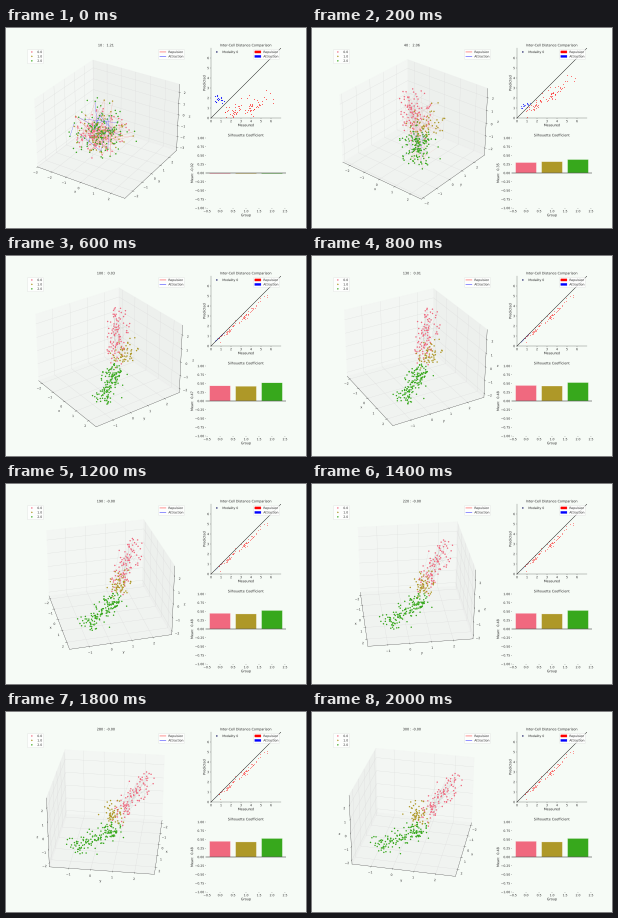
These frames come from a looping animation (300 by 200 pixels, 2.2 s). A matplotlib script:

```python
import numpy as np
import matplotlib.pyplot as plt
from matplotlib import patheffects
from matplotlib.animation import FuncAnimation
from matplotlib.lines import Line2D
from matplotlib.patches import Patch
from mpl_toolkits.mplot3d.art3d import Line3DCollection

INK = "#262626"
plt.rcParams.update({
    "font.family": "DejaVu Sans",
    "font.size": 12,
    "axes.titlesize": 12,
    "axes.labelsize": 12,
    "xtick.labelsize": 11,
    "ytick.labelsize": 11,
    "legend.fontsize": 11,
    "text.color": INK,
    "axes.labelcolor": INK,
    "xtick.color": INK,
    "ytick.color": INK,
    "grid.color": "#d8d8d8",
    "path.snap": False,
    "text.hinting": "none",
    # draws letters as outlines, placed between whole pixels
    "path.effects": [patheffects.Normal()],
})

BG = "#f6fbf6"
COLORS = ["#f0697f", "#ae9828", "#37a81c"]
FRAMES, STEP = 11, 200
LOSS = [1.21, 2.06, 0.12, 0.03, 0.01, 0.01, -0.001]
SPREAD = [0.14, 0.085, 0.064, 0.056]
PULL = [0, 0.68, 0.93, 0.98]

rng = np.random.default_rng(7)


def branch(start, bend, end, n):
    """Points spread evenly along a quadratic curve."""
    t = rng.uniform(0, 1, n)[:, None]
    a, b, c = map(np.array, (start, bend, end))
    return (1 - t) ** 2 * a + 2 * t * (1 - t) * b + t ** 2 * c


SIZES = [100, 55, 145]
SHAPE = np.vstack([
    branch((-0.02, 0.15, -0.08), (-0.20, 0.27, 0.07), (-0.38, 0.46, 0.29), SIZES[0]),
    branch((0.04, 0.12, -0.10), (0.22, 0.08, 0.08), (0.30, 0.06, 0.19), SIZES[1]),
    branch((0.38, -0.36, -0.30), (0.16, -0.08, -0.32), (0.00, 0.13, -0.20), SIZES[2]),
])
GROUP = np.repeat([0, 1, 2], SIZES)
NOISE = rng.normal(0, 1, SHAPE.shape)
ORDER = rng.permutation(len(SHAPE))

# Links: a few within a group, many between random cells
FAR = rng.integers(0, len(SHAPE), (80, 2))
NEAR = rng.integers(SIZES[0] + SIZES[1], len(SHAPE), (16, 2))

MEASURED = np.concatenate([rng.uniform(0.8, 3.8, 50), rng.uniform(3, 6, 20)])
JITTER = rng.normal(0, 1, MEASURED.size)
CLOSE = rng.uniform(0.35, 1.3, 16)
CLOSE_JITTER = rng.normal(0, 1, CLOSE.size)

LIM_START = np.array([[-3.0, 2.9], [-2.8, 2.9], [-3.3, 2.7]])
LIM_END = np.array([[-2.3, 2.6], [-1.9, 2.9], [-2.3, 2.7]])
BOX = np.array([1.1905, 1.1905, 0.893])


def at(values, k):
    return values[min(k, len(values) - 1)]


def settle(k, rate):
    return 1 - np.exp(-rate * k)


def draw_cells(k):
    ax = fig.add_axes([20 / 300, 0.1, 160 / 300, 0.8], projection="3d")
    ax.set_facecolor(BG)
    step = min(10 + 30 * k, 300)
    ax.view_init(elev=30, azim=-60 + 0.24 * step)

    lims = LIM_START + (LIM_END - LIM_START) * settle(k, 1.3)
    drift = np.exp(-3 * k) * np.array([-0.03, -0.11, -0.03])
    unit = at(PULL, k) * SHAPE + at(SPREAD, k) * NOISE + drift
    pts = lims.mean(axis=1) + unit / BOX * (lims[:, 1] - lims[:, 0])

    fade = np.exp(-0.9 * k)
    for pairs, color, alpha in ((FAR, "red", 0.35 * fade),
                                (NEAR, "blue", 0.8 * fade)):
        ax.add_collection3d(Line3DCollection(
            pts[pairs], colors=color, linewidths=0.8, alpha=alpha))
    link = [pts[[i, i + 3]] for i in range(0, SIZES[0] - 3, 2)]
    ax.add_collection3d(Line3DCollection(
        link, colors="gray", linewidths=0.6, alpha=0.25))

    ax.scatter(*pts[ORDER].T, c=[COLORS[g] for g in GROUP[ORDER]],
               s=27, linewidths=0, depthshade=False)

    ax.set(xlim=lims[0], ylim=lims[1], zlim=lims[2],
           xlabel="x", ylabel="y", zlabel="z")
    ax.set_title(f"{step} : {at(LOSS, k): .2f}")

    dots = [Line2D([], [], color=c, marker="o", ls="", ms=4) for c in COLORS]
    ax.add_artist(ax.legend(dots, ["0.0", "1.0", "2.0"], loc="upper left"))
    lines = [Line2D([], [], color=c, lw=1.5) for c in ("red", "blue")]
    ax.legend(lines, ["Repulsion", "Attraction"], loc="upper right")


def draw_distances(k):
    ax = fig.add_axes([205 / 300, 0.55, 70 / 300, 0.35])
    ax.set_facecolor(BG)
    ax.spines[["top", "right"]].set_visible(False)
    ax.plot([0, 7], [0, 7], color="black", lw=1.5)

    slope = at([0.33, 0.72, 0.9, 0.92], k)
    noise = at([0.5, 0.35, 0.26, 0.2], k)
    measured = MEASURED + 0.6 * np.exp(-1.5 * k)
    far = np.maximum(slope * measured + noise * JITTER - 0.05, 0.1)
    ax.scatter(measured, far, c="red", s=12, linewidths=0,
               alpha=at([0.5, 0.42, 0.36, 0.3], k))

    rest = np.exp(-0.8 * k)
    near = CLOSE * (1 - rest) + rest * (1.95 + 0.25 * CLOSE_JITTER)
    ax.scatter(CLOSE, near, c="blue", s=16, linewidths=0,
               alpha=0.9 * np.exp(-0.45 * k))

    ax.set(xlim=(0, 7), ylim=(0, 7), xticks=range(7), yticks=range(7),
           xlabel="Measured", ylabel="Predicted")
    ax.set_title("Inter-Cell Distance Comparison")
    dot = Line2D([], [], color="#101060", marker="o", ls="", ms=4)
    ax.add_artist(ax.legend([dot], ["Modality 0"], loc="upper left",
                            frameon=False))
    ax.legend([Patch(color="red"), Patch(color="blue")],
              ["Repulsion", "Attraction"], loc="upper right")


def draw_scores(k):
    ax = fig.add_axes([200 / 300, 0.1, 80 / 300, 0.35])
    ax.set_facecolor(BG)
    ax.spines[:].set_visible(False)
    dip = 0.02 * np.exp(-3 * k)
    tops = [top * settle(k, rate) - dip
            for top, rate in ((0.45, 1.1), (0.43, 1.4), (0.53, 1.3))]
    ax.bar(range(3), tops, color=COLORS, edgecolor="white", lw=1)
    ax.axhline(0, color="black", lw=1.5)
    mean = 0.48 * settle(k, 1.3) - dip
    ax.set(xlim=(-0.54, 2.54), ylim=(-1, 1),
           xticks=np.arange(-0.5, 2.6, 0.5), yticks=np.arange(-1, 1.1, 0.25),
           xlabel="Group", ylabel=f"Mean: {mean: .2f}")
    ax.set_title("Silhouette Coefficient")


def draw(k):
    fig.clear()
    draw_cells(k)
    draw_distances(k)
    draw_scores(k)
    return []


fig = plt.figure(figsize=(15, 10), dpi=20, facecolor=BG)
anim = FuncAnimation(fig, draw, frames=FRAMES, interval=STEP,
                     init_func=lambda: [], repeat=True, repeat_delay=0)
plt.show()
```
